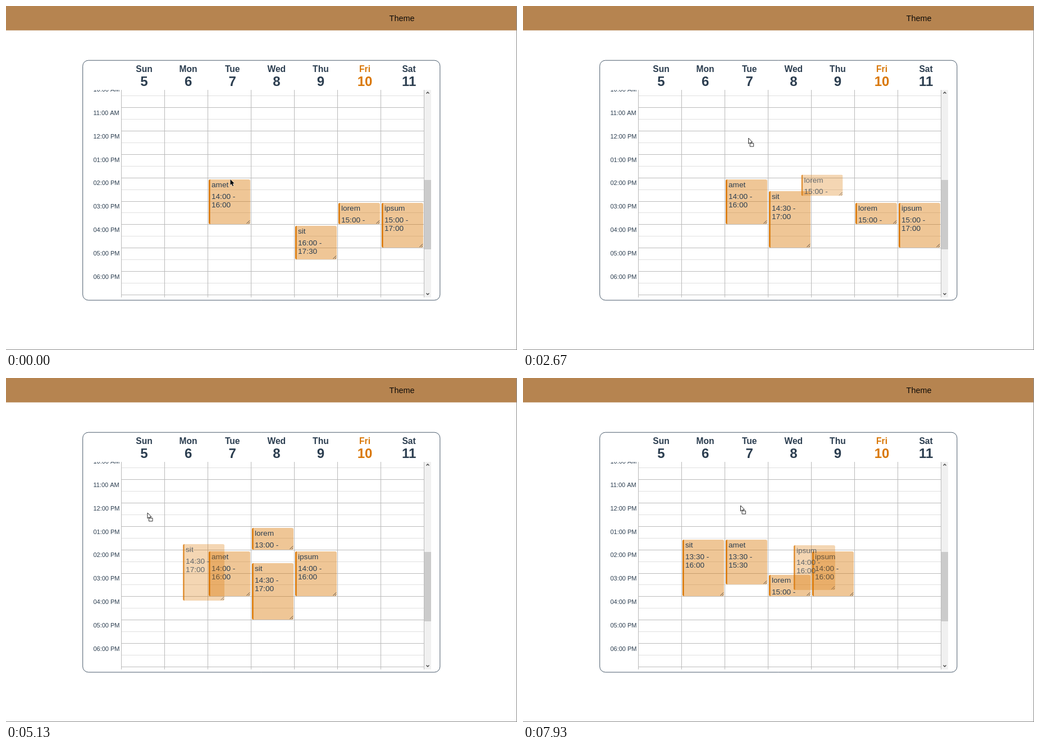
Write an HTML page with a canvas that moves like this. It is 910x615 px and loops after 8 s.

```html
<!DOCTYPE html>
<html lang="en">
<head>
<meta charset="utf-8">
<title>Week calendar</title>
<style>
html, body { margin: 0; width: 100%; height: 100%; overflow: hidden; background: #fff; }
canvas { display: block; width: 910px; height: 615px; }
</style>
</head>
<body>
<canvas id="stage" width="910" height="615"></canvas>
<script>
const ctx = document.getElementById('stage').getContext('2d');
const LOOP = 8000, STEP = 1000 / 15;
const SANS = '"Liberation Sans", Arial, sans-serif';
const INK = '#2c3e50', AMBER = '#d97706';
const LEFT = 205, COL = 77.1, HOUR = 41.83, POINTER_SCALE = 4 / 3;
const DAYS = ['Sun', 'Mon', 'Tue', 'Wed', 'Thu', 'Fri', 'Sat'];

const START = {
  amet: { day: 2, hour: 14, len: 2 },
  sit: { day: 4, hour: 16, len: 1.5 },
  lorem: { day: 5, hour: 15, len: 1 },
  ipsum: { day: 6, hour: 15, len: 2 }
};

// The pointer takes hold at "grab" and lets go at "drop"
const ACTIONS = [
  { id: 'sit', from: 70, to: 530, grab: [399.5, 310], drop: [359, 252] },
  { id: 'sit', from: 930, to: 1470, grab: [386, 291], drop: [386, 329], resize: true },
  { id: 'lorem', from: 2130, to: 3130, grab: [474, 274], drop: [366.5, 212.5] },
  { id: 'ipsum', from: 3870, to: 4470, grab: [509, 263.3], drop: [398, 243.5] },
  { id: 'sit', from: 4730, to: 5400, grab: [344.2, 266.5], drop: [225, 220] },
  { id: 'amet', from: 5730, to: 6270, grab: [287, 247], drop: [303, 220] },
  { id: 'lorem', from: 6670, to: 7270, grab: [369.2, 222], drop: [356, 267] },
  { id: 'ipsum', from: 7530, to: LOOP, grab: [412.3, 236.3], drop: [387.5, 228] }
];

// Bends and rests of the pointer between grabs and drops: time, x, y
const BENDS = [
  [2000, 489.5, 279.5], [2570, 418.5, 246.5], [2930, 366.5, 212.5], [3330, 366.5, 212.5],
  [4200, 460.5, 263], [5130, 252, 241], [5930, 285, 293], [6730, 367, 235],
  [7000, 286, 331], [7930, 387.5, 228]
];

const PATH = BENDS.concat(ACTIONS.flatMap(a => [[a.from, ...a.grab], [a.to, ...a.drop]]))
  .sort((a, b) => a[0] - b[0]);

// Smooth slope that never overshoots its neighbours
function slope(i, k) {
  const p = PATH[i - 1], q = PATH[i], r = PATH[i + 1];
  if (!p || !r) return 0;
  const a = (q[k] - p[k]) / (q[0] - p[0]), b = (r[k] - q[k]) / (r[0] - q[0]);
  return a * b <= 0 ? 0 : 2 * a * b / (a + b);
}

function pointerAt(t) {
  const next = PATH.findIndex(p => p[0] > t);
  if (next === 0) return PATH[0].slice(1);
  const i = next - 1, a = PATH[i], b = PATH[next], span = b[0] - a[0];
  const u = (t - a[0]) / span, v = 1 - u;
  return [1, 2].map(k =>
    a[k] * v * v * (1 + 2 * u) + b[k] * u * u * (3 - 2 * u) +
    span * u * v * (slope(i, k) * v - slope(next, k) * u));
}

const lineY = hour => 181.2 + (hour - 11) * HOUR;
const clock = h => `${Math.floor(h)}:${h % 1 ? '30' : '00'}`;

function boxOf(e) {
  const y = Math.round(lineY(e.hour) + 3);
  return { x: Math.round(206.7 + e.day * COL), y, w: 74, h: Math.round(lineY(e.hour + e.len)) - y };
}

// Day and half hour under the pointer
function cellAt([x, y]) {
  return {
    day: Math.floor((x * POINTER_SCALE - LEFT) / COL),
    hour: Math.floor(2 * (11 + (y * POINTER_SCALE - lineY(11)) / HOUR)) / 2
  };
}

function eventsAt(t) {
  const events = {};
  for (const id in START) events[id] = { ...START[id] };
  for (const a of ACTIONS.filter(a => t >= a.to)) {
    const e = events[a.id], cell = cellAt(a.drop);
    if (a.resize) e.len = cell.hour - e.hour;
    else Object.assign(e, cell);
  }
  return events;
}

function rect(x, y, w, h, color) {
  ctx.fillStyle = color;
  ctx.fillRect(x, y, w, h);
}

function text(str, x, y, size, color = INK, align = 'left', weight = '') {
  ctx.font = `${weight} ${size}px ${SANS}`;
  ctx.textAlign = align;
  ctx.fillStyle = color;
  ctx.fillText(str, x, y);
}

function stroke(points, color, width = 1) {
  ctx.beginPath();
  points.forEach(p => ctx.lineTo(...p));
  ctx.strokeStyle = color;
  ctx.lineWidth = width;
  ctx.stroke();
}

function drawPage() {
  rect(0, 0, 910, 615, '#fff');
  rect(0, 0, 910, 43.6, '#b68450');
  rect(909, 0, 1, 615, '#8c8c8c');
  rect(0, 614, 910, 1, '#8c8c8c');
  text('Theme', 705, 27, 14.4, '#0c0a08', 'center');

  ctx.beginPath();
  ctx.roundRect(136.7, 97.2, 636.2, 428.8, 10);
  ctx.strokeStyle = '#4a5b6c';
  ctx.lineWidth = 1;
  ctx.stroke();
  DAYS.forEach((name, i) => {
    const x = 246 + i * 78.6, color = i === 5 ? AMBER : INK;
    text(name, x, 118, 15.6, color, 'center', 'bold');
    text(5 + i, x, 143, 24, color, 'center', 'bold');
  });
}

function drawGrid() {
  ctx.save();
  ctx.beginPath();
  ctx.rect(138, 150, 620, 371);
  ctx.clip();
  for (let h = 10; h < 20; h++) {
    rect(LEFT, Math.round(lineY(h + 0.5)), 540, 1, '#e0e0e0');
    rect(LEFT, Math.round(lineY(h)), 540, 1, '#bcbcbc');
    const label = String(h > 12 ? h - 12 : h).padStart(2, '0');
    if (h < 19) text(`${label}:00 ${h < 12 ? 'AM' : 'PM'}`, 155.4, lineY(h) + 13.8, 11);
  }
  for (let i = 0; i <= 7; i++) rect(Math.floor(LEFT + 0.2 + i * COL), 150, 1, 371, '#b9b9b9');
  rect(745, 150, 12, 371, '#f0f0f0');
  rect(745, 311, 12, 124, '#cbcbcb');
  for (const [y, tip] of [[156.5, 154], [513.5, 516]]) {
    stroke([[748.5, y], [751, tip], [753.5, y]], '#444', 1.4);
  }
  ctx.restore();
}

function drawEvent(id, e, { x, y, w, h }, alpha = 1) {
  ctx.save();
  ctx.globalAlpha = alpha;
  ctx.beginPath();
  ctx.roundRect(x, y, w, h, 3);
  ctx.clip();
  rect(x, y, w, h, 'rgba(217,119,6,0.42)');
  rect(x, y, 2.6, h, AMBER);
  text(id, x + 5, y + 14.4, 13.6);
  text(clock(e.hour) + ' -', x + 5, y + 34.8, 13.6);
  if (e.len > 1) text(clock(e.hour + e.len), x + 5, y + 50, 13.6);
  const r = x + w - 1, b = y + h - 1;
  for (const d of [5.5, 2]) stroke([[r - d, b], [r, b - d]], '#4b4540');
  ctx.restore();
}

// Outline first or last decides how heavy it looks
function paint(fill, line, heavy) {
  ctx.fillStyle = fill;
  ctx.strokeStyle = line;
  ctx.lineWidth = 1;
  if (heavy) ctx.fill();
  ctx.stroke();
  if (!heavy) ctx.fill();
}

function arrow(fill, line, heavy) {
  ctx.beginPath();
  [[0, 0], [0, 10], [2.3, 8], [4, 12], [5.6, 11.3], [4, 7.5], [7, 7.3]]
    .forEach(p => ctx.lineTo(...p));
  ctx.closePath();
  paint(fill, line, heavy);
}

const POINTERS = {
  arrow() {
    arrow('#000', '#fff');
  },
  drag() {
    arrow('#fff', '#222', true);
    ctx.beginPath();
    ctx.rect(2.5, 9.5, 6.5, 5.5);
    paint('#fff', '#333', true);
  },
  hand() {
    ctx.beginPath();
    ctx.moveTo(-0.7, 8.5);
    ctx.lineTo(-0.7, 1);
    ctx.quadraticCurveTo(0.6, -0.8, 1.9, 1);
    ctx.lineTo(1.9, 5);
    ctx.quadraticCurveTo(7.5, 5, 7.2, 8);
    ctx.quadraticCurveTo(7.2, 12, 5.5, 14.5);
    ctx.lineTo(-0.5, 14.5);
    ctx.lineTo(-3.8, 8.5);
    ctx.quadraticCurveTo(-2.8, 6.8, -0.7, 8.5);
    paint('#fff', '#000', true);
    for (const x of [1.9, 3.7, 5.4]) stroke([[x, 5], [x, 8]], '#000', 0.9);
  },
  size() {
    stroke([[-4, -4], [4, 4]], '#000', 1.6);
    for (const s of [-1, 1]) {
      ctx.beginPath();
      ctx.moveTo(5 * s, 5 * s);
      ctx.lineTo(5 * s, 0.5 * s);
      ctx.lineTo(0.5 * s, 5 * s);
      ctx.closePath();
      paint('#000', '#fff');
    }
  }
};

function draw(t) {
  const events = eventsAt(t), [px, py] = pointerAt(t);
  const mx = px * POINTER_SCALE, my = py * POINTER_SCALE;
  const action = ACTIONS.find(a => t >= a.from && t < a.to);
  const pressed = ACTIONS.some(a => t < a.from && t >= a.from - 70);
  let over = false, ghost = null;

  drawPage();
  drawGrid();
  for (const id in events) {
    const box = boxOf(events[id]);
    if (action && action.id === id) {
      const dx = (px - action.grab[0]) * POINTER_SCALE;
      const dy = (py - action.grab[1]) * POINTER_SCALE;
      if (action.resize) box.h += dy;
      else ghost = { ...box, x: box.x + dx, y: box.y + dy };
    }
    drawEvent(id, events[id], box);
    over ||= mx > box.x && mx < box.x + box.w && my > box.y && my < box.y + box.h;
  }
  if (ghost) drawEvent(action.id, events[action.id], ghost, 0.72);

  const kind = ghost ? 'drag' : action ? 'size' : over && !pressed ? 'hand' : 'arrow';
  ctx.save();
  ctx.translate(px, py);
  POINTERS[kind]();
  ctx.restore();
}

const begin = performance.now();
function frame() {
  const t = (performance.now() - begin) % LOOP;
  const n = Math.floor(t / STEP + 0.06);
  draw(Math.round(n * STEP / 10) * 10 % LOOP);
  requestAnimationFrame(frame);
}
frame();
</script>
</body>
</html>
```
